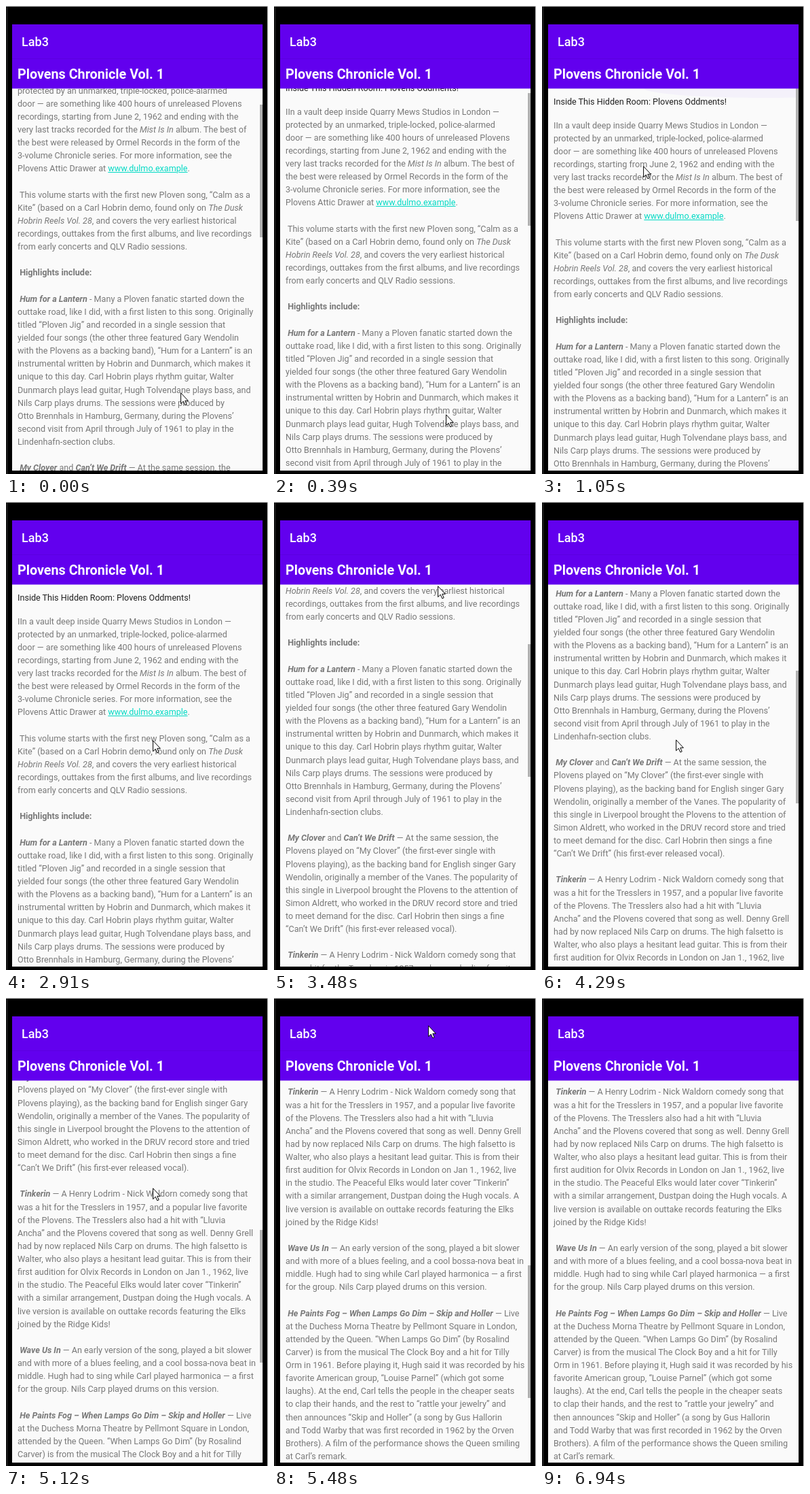
Animation, 386 px wide and 688 px high, one loop 7490 ms. Source, as an HTML page:

```html
<!DOCTYPE html>
<html lang="en">
<head>
<meta charset="utf-8">
<title>Lab3</title>
<style>
  html, body { margin: 0; width: 100%; height: 100%; overflow: hidden; background: #000; }
  #stage { position: relative; width: 386px; height: 688px; overflow: hidden; background: #000;
    font-family: Roboto, "Open Sans", sans-serif; }
  #stage div, #stage pre, #stage svg { position: absolute; margin: 0; white-space: pre; }
  .rim-top { left: 0; top: 0; width: 386px; height: 1px; background: #b4b4b4; }
  .rim-left { left: 0; top: 1px; width: 3px; height: 687px; background: #161616; }
  .rim-right { left: 385px; top: 0; width: 1px; height: 688px; background: #d0d0d0; }
  .bar { left: 9px; top: 27px; width: 369px; height: 94px; background: #6200ee; color: #fff; }
  .seam { left: 0; top: 50px; width: 369px; height: 1px; background: #5b00e0; }
  .edge { left: 9px; top: 121px; width: 369px; height: 1px; background: #6200ee66; }
  .app { left: 14px; top: 16px; font: 500 18px/20px Roboto, sans-serif; }
  .title { left: 8px; top: 62px; font: 700 19.76px/24px Roboto, sans-serif; }
  #view { left: 9px; top: 121px; width: 369px; height: 562px; overflow: hidden; background: #fafafa; }
  #page { left: 8px; top: 0; width: 361px; font-size: 12.6px; line-height: 19.12px; color: #787878; }
  #page .lead { left: 0; top: 9.6px; color: #212121; }
  #page pre { left: 0; top: 44.6px; font: inherit; }
  em { font-weight: 700; }
  u { color: #03dac5; text-decoration-thickness: 1px; }
  #thumb { left: 365px; top: 0; width: 4px; height: 195px; background: #b0b0b0; }
  #glow { left: 141px; top: -14px; width: 360px; height: 28px; border-radius: 50%; background: #6200ee; }
  #cursor { left: 0; top: 0; overflow: visible; }
</style>
</head>
<body>
<div id="stage">
  <div class="rim-top"></div><div class="rim-left"></div><div class="rim-right"></div>
  <div class="bar">
    <div class="seam"></div>
    <div class="app">Lab3</div>
    <div class="title">Plovens Chronicle Vol. 1</div>
  </div>
  <div id="view">
    <div id="page">
      <div class="lead">Inside This Hidden Room: Plovens Oddments!</div>
<pre>
IIn a vault deep inside Quarry Mews Studios in London —
protected by an unmarked, triple-locked, police-alarmed
door — are something like 400 hours of unreleased Plovens
recordings, starting from June 2, 1962 and ending with the
very last tracks recorded for the <i>Mist Is In</i> album. The best of
the best were released by Ormel Records in the form of the
3-volume Chronicle series. For more information, see the
Plovens Attic Drawer at <u>www.dulmo.example</u>.

 This volume starts with the first new Ploven song, “Calm as a
Kite” (based on a Carl Hobrin demo, found only on <i>The Dusk</i>
<i>Hobrin Reels Vol. 28</i>, and covers the very earliest historical
recordings, outtakes from the first albums, and live recordings
from early concerts and QLV Radio sessions.

 <b>Highlights include:</b>

 <em><i>Hum for a Lantern</i></em> - Many a Ploven fanatic started down the
outtake road, like I did, with a first listen to this song. Originally
titled “Ploven Jig” and recorded in a single session that
yielded four songs (the other three featured Gary Wendolin
with the Plovens as a backing band), “Hum for a Lantern” is an
instrumental written by Hobrin and Dunmarch, which makes it
unique to this day. Carl Hobrin plays rhythm guitar, Walter
Dunmarch plays lead guitar, Hugh Tolvendane plays bass, and
Nils Carp plays drums. The sessions were produced by
Otto Brennhals in Hamburg, Germany, during the Plovens’
second visit from April through July of 1961 to play in the
Lindenhafn-section clubs.

 <em>My Clover</em> and <em>Can’t We Drift</em> — At the same session, the
Plovens played on “My Clover” (the first-ever single with
Plovens playing), as the backing band for English singer Gary
Wendolin, originally a member of the Vanes. The popularity of
this single in Liverpool brought the Plovens to the attention of
Simon Aldrett, who worked in the DRUV record store and tried
to meet demand for the disc. Carl Hobrin then sings a fine
“Can’t We Drift” (his first-ever released vocal).

 <em>Tinkerin</em> — A Henry Lodrim - Nick Waldorn comedy song that
was a hit for the Tresslers in 1957, and a popular live favorite
of the Plovens. The Tresslers also had a hit with “Lluvia
Ancha” and the Plovens covered that song as well. Denny Grell
had by now replaced Nils Carp on drums. The high falsetto is
Walter, who also plays a hesitant lead guitar. This is from their
first audition for Olvix Records in London on Jan 1., 1962, live
in the studio. The Peaceful Elks would later cover “Tinkerin”
with a similar arrangement, Dustpan doing the Hugh vocals. A
live version is available on outtake records featuring the Elks
joined by the Ridge Kids!

 <em>Wave Us In</em> — An early version of the song, played a bit slower
and with more of a blues feeling, and a cool bossa-nova beat in
middle. Hugh had to sing while Carl played harmonica — a first
for the group. Nils Carp played drums on this version.

 <em>He Paints Fog – When Lamps Go Dim – Skip and Holler</em> — Live
at the Duchess Morna Theatre by Pellmont Square in London,
attended by the Queen. “When Lamps Go Dim” (by Rosalind
Carver) is from the musical The Clock Boy and a hit for Tilly
Orm in 1961. Before playing it, Hugh said it was recorded by his
favorite American group, “Louise Parnel” (which got some
laughs). At the end, Carl tells the people in the cheaper seats
to clap their hands, and the rest to “rattle your jewelry” and
then announces “Skip and Holler” (a song by Gus Hallorin
and Todd Warby that was first recorded in 1962 by the Orven
Brothers). A film of the performance shows the Queen smiling
at Carl’s remark.
</pre>
    </div>
    <div id="glow"></div>
    <div id="thumb"></div>
  </div>
  <div class="edge"></div>
  <svg id="cursor" width="12" height="20" viewBox="0 0 12 20">
    <path d="M.6 .8V16.6L4.3 13.2L6.8 18.8L9.2 17.8L6.8 12.3H11.4Z" fill="#fff" stroke="#000" stroke-width="1"/>
  </svg>
</div>
<script>
const LOOP = 7490;
const STEP = 133.4;      // the screen is refreshed once per step
const LEAD = 32;         // refreshes land slightly early
const LAST_STEP = 52;    // the pointer has left the stage
const FIRST_TOP = 70;
const THUMB_RATIO = 195 / 562;

const $ = id => document.getElementById(id);
const clamp = v => Math.min(1, Math.max(0, v));
const easeOut = k => 1 - (1 - k) ** 2;

// Times below count steps. The first flick pulls past the top of the page.
const flicks = [
  { start: 0, length: 8, distance: -82 },
  { start: 22, length: 6, distance: 300 },
  { start: 30, length: 2, distance: 78 },
  { start: 36, length: 5, distance: 417 }
];

// Places the pointer passes: step, x, y.
const path = [
  [0, 257, 568], [5, 250, 622], [7, 250, 622], [8, 149, 235], [12, 51, 140], [13, 229, 181],
  [15, 36, 90], [17, 194, 27], [20, 202, 284], [22, 216, 350], [26, 241, 123], [30, 226, 390],
  [31, 222, 33], [32, 197, 349], [34, 197, 349], [36, 208, 438], [41, 227, 40], [43, 227, 40],
  [45, 181, 484], [47, 181, 511], [51, 318, 685]
];

function pointerAt(n) {
  const next = path.findIndex(p => p[0] > n);
  if (next < 0) return path[path.length - 1].slice(1);
  const [t0, x0, y0] = path[next - 1], [t1, x1, y1] = path[next];
  const k = (n - t0) / (t1 - t0);
  return [x0 + (x1 - x0) * k, y0 + (y1 - y0) * k].map(Math.round);
}

function scrollAt(n) {
  return flicks.reduce((top, f) =>
    top + f.distance * easeOut(clamp((n - f.start) / f.length)), FIRST_TOP);
}

// The scroll bar fades out once the page has been still for two steps.
function thumbAlpha(n) {
  const begun = flicks.filter(f => f.start < n).pop() || flicks[0];
  return clamp((4 - (n - begun.start - begun.length)) / 2);
}

function draw(time) {
  const n = Math.floor((time % LOOP + LEAD) / STEP);
  const raw = scrollAt(n);
  const top = Math.round(Math.max(0, raw));
  const pull = Math.max(0, -raw);
  const alpha = thumbAlpha(n);
  const [x, y] = pointerAt(n);
  $("page").style.transform = `translateY(${-top}px)`;
  $("thumb").style.transform = `translateY(${Math.round(top * THUMB_RATIO)}px)`;
  $("thumb").style.opacity = alpha;
  $("glow").style.opacity = pull * alpha * .003;
  $("cursor").style.transform = `translate(${x}px, ${y}px)`;
  $("cursor").style.visibility = n < LAST_STEP ? "visible" : "hidden";
}

const start = performance.now();
function frame() {
  draw(performance.now() - start);
  requestAnimationFrame(frame);
}
frame();
</script>
</body>
</html>
```
